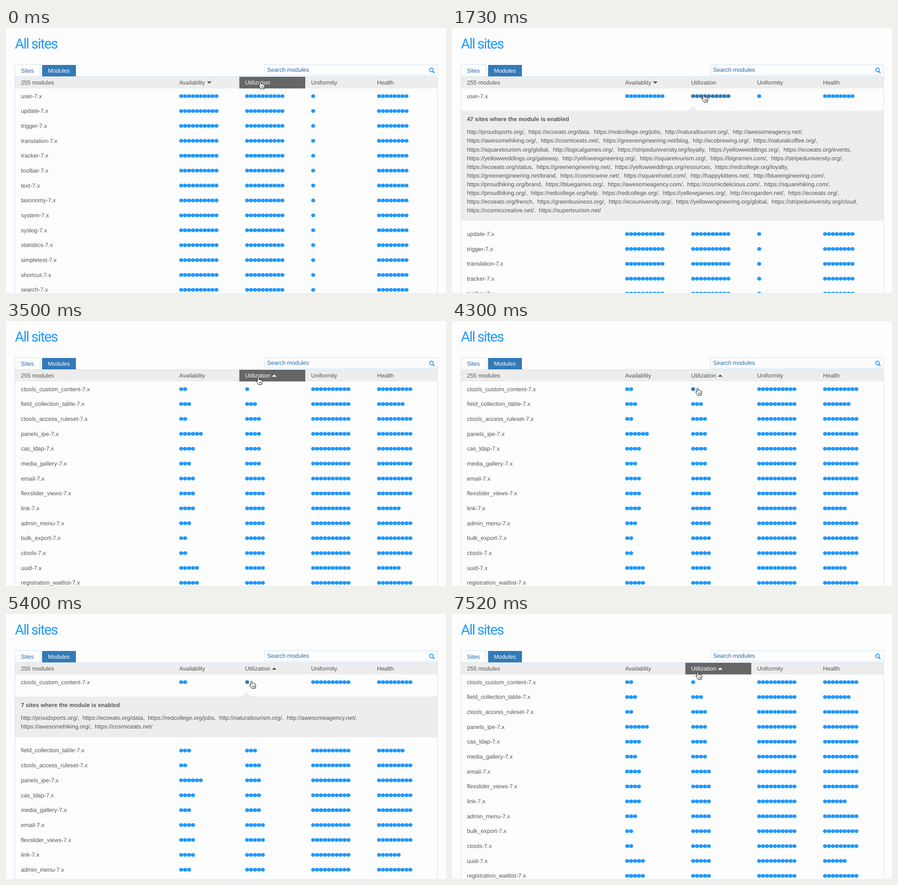
Recreate the animation shown at these times as an HTML page. Size 963 by 581 pixels, loop 7.94 s.

```html
<!DOCTYPE html>
<html>
<head>
<meta charset="utf-8">
<style>
html, body { margin: 0; width: 100%; height: 100%; overflow: hidden; background: #fdfdfd; }
svg { display: block; }
text { font: 12.7px "Liberation Sans", Arial, sans-serif; fill: #555; text-rendering: geometricPrecision; }
text.title { font: 31px Roboto, sans-serif; letter-spacing: -1.8px; fill: #2199fd; }
text.link { fill: #2468ac; }
text.on { fill: #fff; }
text.bold { font-weight: bold; }
.frame { fill: none; stroke: #cde2f2; }
</style>
</head>
<body>
<svg id="stage" width="963" height="581" viewBox="0 0 963 581"></svg>
<script>
const LOOP = 7940, BLUE = '#2199fd', DARK = '#337ab7', GREY = '#ededed';
const COLS = [379, 523.3, 667.8, 812];
const HEADS = ['Availablity', 'Utilization', 'Uniformity', 'Health'];

const byName = 'user update trigger translation tracker toolbar text taxonomy system syslog statistics simpletest shortcut search'
  .split(' ').map(name => [name, 10, 10, 1, 8]);
const byUse = [
  ['ctools_custom_content', 2, 1, 10, 9], ['field_collection_table', 3, 3, 10, 7],
  ['ctools_access_ruleset', 2, 4, 10, 9], ['panels_ipe', 6, 4, 10, 9],
  ['cas_ldap', 4, 4, 10, 9], ['media_gallery', 3, 4, 10, 9],
  ['email', 4, 5, 10, 9], ['flexslider_views', 4, 5, 10, 9],
  ['link', 4, 5, 10, 6], ['admin_menu', 3, 5, 10, 9],
  ['bulk_export', 2, 5, 10, 9], ['ctools', 2, 5, 10, 9],
  ['uuid', 5, 5, 10, 6], ['registration_waitlist', 5, 5, 10, 9]
];

const manySites = [
  'http://proudsports.org/, https://ecoeats.org/data, https://redcollege.org/jobs, http://naturaltourism.org/, http://awesomeagency.net/,',
  'https://awesomehiking.org/, https://cosmiceats.net/, https://greenengineering.net/blog, http://ecobrewing.org/, https://naturalcoffee.org/,',
  'https://squaretourism.org/global, http://logicalgames.org/, https://stripeduniversity.org/loyalty, https://yellowweddings.org/, https://ecoeats.org/events,',
  'https://yellowweddings.org/gateway, http://yellowengineering.org/, https://squaretourism.org/, https://bigramen.com/, https://stripeduniversity.org/,',
  'https://ecoeats.org/status, https://greenengineering.net/, https://yellowweddings.org/resources, https://redcollege.org/loyalty,',
  'https://greenengineering.net/brand, https://cosmicwine.net/, https://squarehotel.com/, http://happykittens.net/, http://blueengineering.com/,',
  'https://proudhiking.org/brand, https://bluegames.org/, https://awesomeagency.com/, https://cosmicdelicious.com/, https://squarehiking.com/,',
  'https://proudhiking.org/, https://redcollege.org/help, https://redcollege.org/, https://yellowgames.org/, http://ecogarden.net/, https://ecoeats.org/,',
  'https://ecoeats.org/french, https://greenbusiness.org/, https://ecouniversity.org/, https://yellowengineering.org/global, https://stripeduniversity.org/cloud,',
  'https://cosmiccreative.net/, https://supertourism.net/'
];
const fewSites = [manySites[0], 'https://awesomehiking.org/, https://cosmiceats.net/'];

// start, end, step count, target x, target y of the pointer's fingertip
const moves = [
  [540, 690, 3, 551, 146.5], [2630, 2780, 3, 552, 123.5],
  [4100, 4300, 4, 537.5, 147], [7430, 7520, 2, 538, 127.5]
];

// start, push on the rows below, panel height, bump, text
const stages = [
  [0, 0, 0, 0, 0], [1230, 255, 0, 0, 0], [1290, 269.7, 241.5, 1, 0], [1730, 269.7, 241.5, 1, 1], [2240, 0, 0, 0, 0],
  [4960, 102.6, 0, 0, 0], [5020, 117.3, 89.5, 1, 0], [5400, 117.3, 89.5, 1, 1], [6510, 14.6, 0, 1, 0], [6560, 0, 0, 0, 0]
];

const text = (x, y, str, cls = '') => `<text x="${x}" y="${y}" class="${cls}">${str}</text>`;
const rect = (x, y, w, h, fill) => `<rect x="${x}" y="${y}" width="${w}" height="${h}" fill="${fill}"/>`;
const box = (x, y, w, h) => `<rect x="${x}" y="${y}" width="${w}" height="${h}" class="frame"/>`;
const path = (d, fill) => `<path d="${d}" fill="${fill}"/>`;

function pointerAt(t) {
  let x = 557, y = 117.5;
  for (const [from, to, n, tx, ty] of moves) {
    if (t < from) break;
    const k = Math.min(1, (Math.floor((t - from) / (to - from) * (n - 1)) + 1) / n);
    x += (tx - x) * k;
    y += (ty - y) * k;
  }
  return [x, y];
}

function dots(x, y, count, fill) {
  let out = '';
  for (let i = 0; i < count; i++)
    out += `<ellipse cx="${x + 4.5 + i * 8.57}" cy="${y}" rx="4.5" ry="4.1" fill="${fill}"/>`;
  return out;
}

function header(sorted, hover) {
  let out = rect(20, 107, 924, 25.5, GREY) + text(32.7, 124, '255 modules');
  if (hover) out += rect(510.7, 107, 144.3, 25.5, '#666');
  HEADS.forEach((name, i) => out += text(COLS[i], 124, name, hover && i === 1 ? 'on' : ''));
  return out + (sorted
    ? path('M581.8 122.3h10.4l-5.2-5z', hover ? '#fff' : '#555')
    : path('M439.6 117.3h10.4l-5.2 5z', '#555'));
}

function rows(list, push, hover) {
  return list.map(([name, ...counts], i) => {
    const y = 149.3 + i * 32.68 + (i ? push : 0);
    return text(32.7, y + 4.2, name + '-7.x') +
      counts.map((n, c) => dots(COLS[c], y, n, hover && !i && c === 1 ? DARK : BLUE)).join('');
  }).join('');
}

function panel(sorted, height, bump, filled) {
  let out = height ? rect(20, 181, 924, height, GREY) : '';
  if (bump) out += path('M517 181l9.8-10 9.8 10z', GREY);
  if (filled) {
    out += text(32.7, 204.3, (sorted ? 7 : 47) + ' sites where the module is enabled', 'bold');
    (sorted ? fewSites : manySites).forEach((line, i) =>
      out += text(32.7, 232.4 + i * 19.05, line.replace(/, /g, ',\u00a0 ')));
  }
  return out;
}

const hand = ([x, y]) => `<g transform="translate(${x} ${y})" stroke="#000" stroke-linejoin="round">
  <path fill="#fff" d="M-1.6 1.2Q0-1 1.6 1.2V5.4Q3.2 4.4 4.4 6Q6 5 7 6.6Q9 6 9.2 8.4V11Q9 13 8 14V16H.5Q-1 13-4 9.6Q-4.8 7.4-2.8 7.6L-1.6 8.8Z"/>
  <path stroke-width=".8" d="M2.4 10v3.5M4.4 10v3.5M6.4 10v3.5"/></g>`;

const page = text(19.5, 44.7, 'All sites', 'title') +
  box(19.5, 80.5, 55, 26) + text(32.7, 98, 'Sites', 'link') +
  rect(79, 81, 74, 25.5, DARK) + text(91.7, 98, 'Modules', 'on') +
  box(565.5, 80.5, 379, 23) + text(571.5, 96.3, 'Search modules', 'link') +
  `<path d="M934 95l3.6 3.6" stroke="${BLUE}" stroke-width="2.4"/>
   <circle cx="931.2" cy="92" r="4" fill="none" stroke="${BLUE}" stroke-width="1.8"/>` +
  box(19.5, 106.5, 925, 500);

const stage = document.getElementById('stage');
let last = '';

function draw(now) {
  const t = now % LOOP;
  const sorted = t >= 3500;
  const pointer = pointerAt(t);
  const [, push, height, bump, filled] = stages.filter(s => s[0] <= t).pop();
  const key = [sorted, pointer, push, filled, height].join();
  if (key !== last) {
    last = key;
    stage.innerHTML = page + header(sorted, pointer[1] < 132.5) + panel(sorted, height, bump, filled) +
      rows(sorted ? byUse : byName, push, pointer[1] > 141) + hand(pointer);
  }
  requestAnimationFrame(() => draw(performance.now()));
}
draw(0);
</script>
</body>
</html>
```
